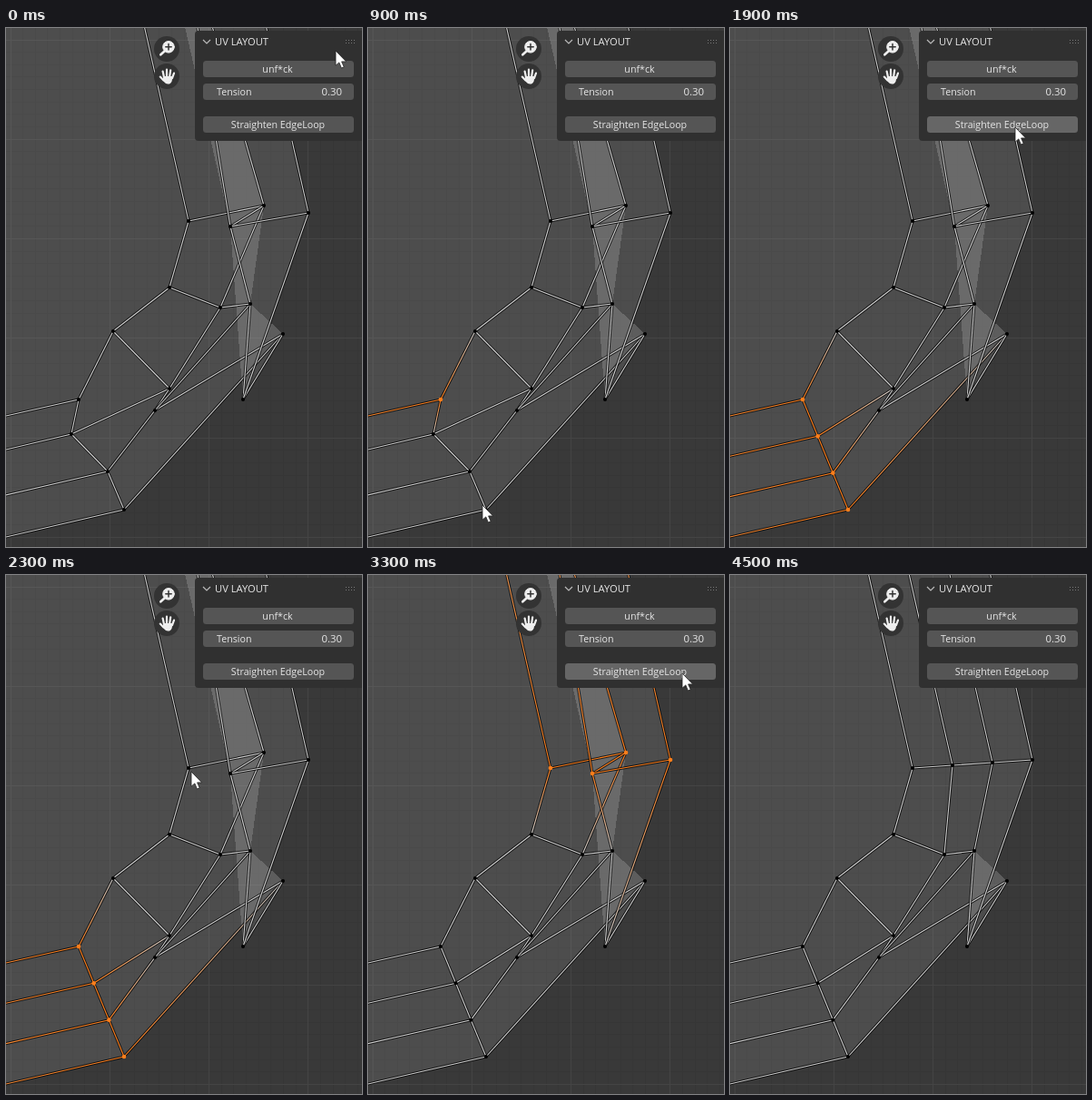
Recreate the animation shown at these times as an HTML page. Size 392 by 570 pixels, loop 5000 ms.

```html
<!DOCTYPE html>
<html lang="en">
<head>
<meta charset="utf-8">
<title>UV layout</title>
<style>
  html, body { margin: 0; width: 100%; height: 100%; overflow: hidden; background: #393939; }
  svg { display: block; width: 392px; height: 570px; }
  text { font: 10.7px "Open Sans", "Noto Sans", sans-serif; fill: #e6e6e6; }
</style>
</head>
<body>
<svg viewBox="0 0 392 570">
  <defs id="defs"></defs>
  <rect width="392" height="570" fill="#393939"/>
  <g id="grid" shape-rendering="crispEdges"></g>
  <g id="faces" fill="#a8a8a8" fill-opacity=".18" shape-rendering="crispEdges"></g>
  <g id="edges"></g>
  <g id="dots"></g>

  <g fill="#333">
    <circle cx="177" cy="23" r="14"/>
    <circle cx="177" cy="53" r="14"/>
  </g>
  <g stroke="#eee" stroke-linecap="round" fill="none">
    <path d="M174.5 25.5L170.3 29.3" stroke-width="2.6"/>
    <circle cx="179" cy="20.8" r="6.3" fill="#eee"/>
    <path d="M175.8 20.8h6.4M179 17.6v6.4" stroke="#333" stroke-width="1.5"/>
    <path d="M174 54L172.6 47.5M177 53V45.6M180.2 53L181.2 46.4M183 55L185 49.6M173.5 57.5L169.8 53.6" stroke-width="2.2"/>
    <path d="M173 53H183.6L182.6 58.5Q181.5 61.6 178.5 61.6Q175 61.6 173 57.5Z" fill="#eee" stroke="none"/>
  </g>

  <path d="M208 7q0-4 4-4H392V124H212q-4 0-4-4Z" fill="#303030"/>
  <path d="M217 13l4 4l4-4" fill="none" stroke="#bbb" stroke-width="1.2"/>
  <path d="M374 13.5h12M374 16.5h12" stroke="#777" stroke-dasharray="1 2"/>
  <g fill="#555">
    <rect x="217" y="36" width="166" height="18" rx="3.5"/>
    <rect x="217" y="61" width="166" height="18" rx="3.5"/>
    <rect id="button" x="217" y="97" width="166" height="18" rx="3.5"/>
  </g>
  <text x="230" y="19" style="font-size:11.2px">UV LAYOUT</text>
  <text x="299" y="49" text-anchor="middle">unf*ck</text>
  <text x="232" y="74">Tension</text>
  <text x="370" y="74" text-anchor="end" style="font-size:11.4px">0.30</text>
  <text x="299.5" y="110" text-anchor="middle">Straighten EdgeLoop</text>

  <path id="cursor" d="M0 0V16.2L3.8 12.9L6.4 19L9.2 17.8L6.6 11.9H11.6Z" fill="#fff" stroke="#222" stroke-width=".8"/>
</svg>
<script>
const LOOP = 5000, STEP = 100;
const WHITE = "#cfcfcf", ORANGE = "#ff7f1c";
const $ = id => document.getElementById(id);

function set(el, attrs) {
  for (const k in attrs) el.setAttribute(k, attrs[k]);
}
function add(parent, tag, attrs = {}) {
  const el = document.createElementNS("http://www.w3.org/2000/svg", tag);
  set(el, attrs);
  return parent.appendChild(el);
}
const lerp = (a, b, u) => a.map((v, k) => v + (b[k] - v) * u);
const smooth = u => u * u * u * (u * (u * 6 - 15) + 10);
const within = (t, a, b) => t >= a && t < b;

// Four points evenly spaced from a to b
const spread = (a, b) => [0, 1, 2, 3].map(i => lerp(a, b, i / 3));

// Rows across the strip; the first and last lie off stage
const rows = [
  spread([-800, 606], [-800, 744]),
  [[80, 408], [72, 446], [112, 487], [130, 529]],
  [[118, 333], [180, 396], [164, 420], [305, 336]],
  [[180, 285], [236, 307], [269, 303], [261, 408]],
  [[201, 212], [284, 195], [247, 218], [333, 203]],
  spread([41, -490], [174, -495])
];
const loops = {
  1: { pick: 600, extend: 1100, straighten: 1900, drop: 2500 },
  4: { pick: 2500, extend: 3100, straighten: 3500, drop: 4300 }
};

// Cursor moves: start, end, x, y
const home = [363, 25];
const moves = [
  [0, 600, 83, 438], [600, 900, 126, 524], [1100, 1600, 314, 109],
  [1900, 2300, 204, 216], [2500, 2900, 332, 206], [3000, 3300, 346, 108],
  [3600, 4100, 374, 372], [4300, 4500, 396, 532]
];
function cursorAt(t) {
  return moves.reduce((pos, [from, to, x, y]) =>
    lerp(pos, [x, y], smooth(Math.min(1, Math.max(0, (t - from) / (to - from))))), home);
}

function isSelected(t, r, i) {
  const loop = loops[r];
  return !!loop && within(t, i ? loop.extend : loop.pick, loop.drop);
}

function addGrid(pitch, stroke) {
  for (let d = 0; d < 570; d += pitch) {
    const x = Math.floor(5 + d) + .5, y = Math.floor(13 + d) + .5;
    add($("grid"), "path", { d: `M${x} 0V570M0 ${y}H392`, stroke });
  }
}
addGrid(109.3 / 8, "#363636");
addGrid(109.3, "#444");

const faces = [], edges = [], dots = [];
function addEdge(a, b) {
  const id = "g" + edges.length;
  const grad = add($("defs"), "linearGradient", { id, gradientUnits: "userSpaceOnUse" });
  edges.push({
    a, b, grad,
    stops: [0, 1].map(offset => add(grad, "stop", { offset })),
    lines: [
      add($("edges"), "line", { stroke: "#000", "stroke-opacity": .75, "stroke-width": 3 }),
      add($("edges"), "line", { stroke: `url(#${id})`, "stroke-width": 1.1 })
    ]
  });
}
rows.forEach((row, r) => row.forEach((_, i) => {
  const across = i < 3, along = r < 5;
  if (across) addEdge([r, i], [r, i + 1]);
  if (along) addEdge([r, i], [r + 1, i]);
  if (across && along) {
    for (const corner of [[r + 1, i + 1], [r, i]])
      faces.push({ pts: [[r + 1, i], [r, i + 1], corner], el: add($("faces"), "polygon") });
  }
  dots.push({ at: [r, i], el: add($("dots"), "circle") });
}));
const inner = rows.map(row => row[0]).concat([[-800, -490]]);
add($("faces"), "polygon", { points: inner.join(" ") });

function draw(now) {
  const t = Math.floor(now % LOOP / STEP) * STEP;
  const mesh = rows.map((row, r) =>
    loops[r] && t >= loops[r].straighten ? spread(row[0], row[3]) : row);
  const at = ([r, i]) => mesh[r][i];
  const tint = v => isSelected(t, ...v) ? ORANGE : WHITE;

  for (const f of faces) set(f.el, { points: f.pts.map(at).join(" ") });
  for (const e of edges) {
    const [x1, y1] = at(e.a), [x2, y2] = at(e.b);
    for (const el of [e.grad, ...e.lines]) set(el, { x1, y1, x2, y2 });
    set(e.stops[0], { "stop-color": tint(e.a) });
    set(e.stops[1], { "stop-color": tint(e.b) });
  }
  for (const d of dots) {
    const [cx, cy] = at(d.at), on = isSelected(t, ...d.at);
    set(d.el, { cx, cy, r: on ? 2.3 : 2, fill: on ? ORANGE : "#000" });
  }
  const hover = within(t, 1600, 2100) || within(t, 3300, 3800);
  set($("button"), { fill: hover ? "#666" : "#555" });
  set($("cursor"), { transform: `translate(${cursorAt(t)})` });
}

const start = performance.now();
function tick() {
  draw(performance.now() - start);
  requestAnimationFrame(tick);
}
tick();
</script>
</body>
</html>
```
